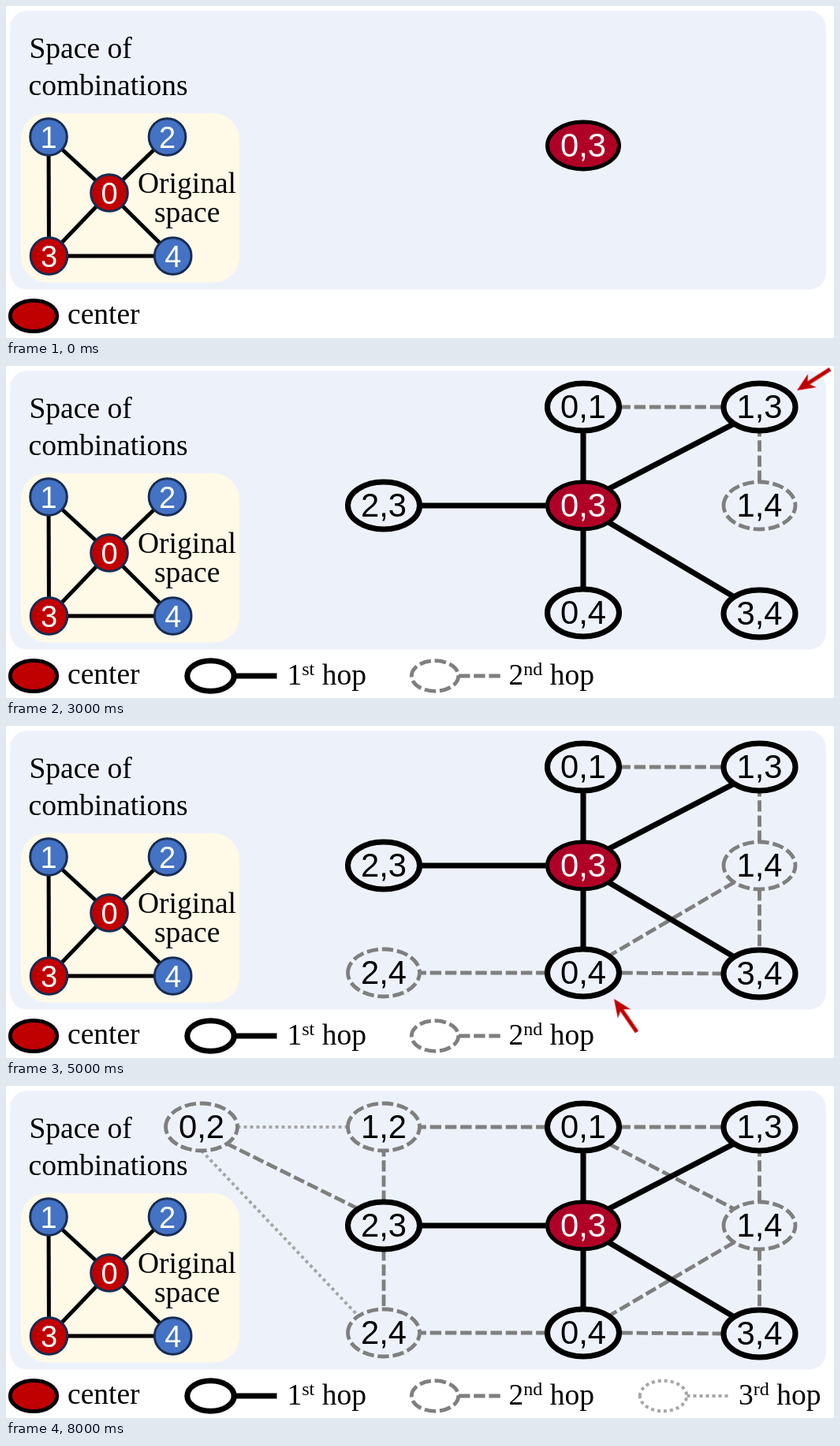
An HTML page for the animation above (9 s loop, 1050x421 px).

```html
<!DOCTYPE html>
<html lang="en">
<head>
<meta charset="utf-8">
<title>Space of combinations</title>
<style>
  html, body { margin: 0; width: 100%; height: 100%; overflow: hidden; background: #fff; }
  svg { display: block; width: 1050px; height: 421px; }
  .serif { font: 37.5px "Liberation Serif", "Times New Roman", serif; }
  .sans { font: 41.7px "Liberation Sans", Arial, sans-serif; text-anchor: middle; }
  .small { font-size: 38px; fill: #fff; }
  .center { fill: #b00026; stroke: #000; stroke-width: 5; }
  .hop1 { fill: none; stroke: #000; stroke-width: 7.1; }
  .hop2 { fill: none; stroke: #7f7f7f; stroke-width: 4.8; stroke-dasharray: 14.4 4.8; }
  .hop3 { fill: none; stroke: #a6a6a6; stroke-width: 4; stroke-dasharray: 4 4; }
  .link { stroke: #000; stroke-width: 5; }
  .arrow { stroke: #c00000; stroke-width: 5; }
</style>
</head>
<body>
<svg id="stage" viewBox="0 0 1050 421"></svg>
<script>
const STEP = 1000, STEPS = 9;
const RX = 45.5, RY = 30;
const stage = document.getElementById('stage');

function add(tag, attrs, parent = stage) {
  const el = document.createElementNS('http://www.w3.org/2000/svg', tag);
  for (const key in attrs) el.setAttribute(key, attrs[key]);
  return parent.appendChild(el);
}

// Visible from step `from` until just before step `to`.
function show(el, from, to = STEPS) {
  if (from === 0 && to === STEPS) return;
  const frames = Array.from({ length: STEPS + 1 }, (_, i) => ({
    opacity: i >= from && (i < to || to === STEPS) ? 1 : 0,
    easing: 'steps(1, end)'
  }));
  el.animate(frames, { duration: STEP * STEPS, iterations: Infinity });
}

function text(str, x, y, cls, parent) {
  add('text', { x, y, class: cls }, parent).textContent = str;
}

function line(x1, y1, x2, y2, cls, parent) {
  return add('line', { x1, y1, x2, y2, class: cls }, parent);
}

// Outline starts at the left end and runs clockwise.
function oval(x, y, rx, ry, cls, parent) {
  const arc = `a${rx} ${ry} 0 0 1`;
  return add('path', {
    d: `M${x - rx} ${y}${arc} ${2 * rx} 0${arc} ${-2 * rx} 0z`, class: cls
  }, parent);
}

// Panels and captions
add('rect', { x: 5, y: 6, width: 1035, height: 353.5, rx: 22, fill: '#edf2fa' });
add('rect', { x: 19, y: 136, width: 277, height: 214.5, rx: 33, fill: '#fff9e7' });
text('Space of', 29.5, 66, 'serif');
text('combinations', 28.5, 112.5, 'serif');
text('Original', 167, 237, 'serif');
text('space', 188, 273.5, 'serif');

// Small graph
const dots = [[131, 237], [54, 166], [204.5, 166], [54.5, 317], [211.7, 317]];
for (const [a, b] of [[0, 1], [0, 2], [0, 3], [0, 4], [1, 3], [3, 4]])
  line(...dots[a], ...dots[b], 'link');
dots.forEach(([cx, cy], i) => {
  const fill = i === 0 || i === 3 ? '#c00000' : '#4472c4';
  add('circle', { cx, cy, r: 23.3, fill, stroke: '#172c51', 'stroke-width': 3 });
  text(i, cx, cy + 13.5, 'sans small');
});

// Combination graph: label -> x, y, class, first step
const nodes = {
  '0,3': [732, 177, 'center', 0],
  '0,1': [732, 52, 'hop1', 1],
  '0,4': [732, 313, 'hop1', 1],
  '1,3': [955.5, 52, 'hop1', 2],
  '2,3': [479, 177, 'hop1', 2],
  '3,4': [955.5, 314, 'hop1', 2],
  '1,4': [955.5, 177, 'hop2', 3],
  '2,4': [479, 313, 'hop2', 5],
  '0,2': [248, 52, 'hop2', 6],
  '1,2': [479, 52, 'hop2', 6]
};

// from, side, to, side, class, first step; sides are eighth turns clockwise from the right
const edges = [
  ['1,2', 4, '0,2', 0, 'hop3', 8],
  ['0,2', 2, '2,4', 5, 'hop3', 8],
  ['0,1', 0, '1,3', 4, 'hop2', 3],
  ['1,4', 6, '1,3', 2, 'hop2', 3],
  ['1,4', 2, '3,4', 6, 'hop2', 4],
  ['3,4', 4, '0,4', 0, 'hop2', 4],
  ['1,4', 3, '0,4', 7, 'hop2', 5],
  ['0,4', 4, '2,4', 0, 'hop2', 5],
  ['2,3', 5, '0,2', 1, 'hop2', 6],
  ['2,3', 6, '1,2', 2, 'hop2', 6],
  ['2,3', 2, '2,4', 6, 'hop2', 6],
  ['0,1', 4, '1,2', 0, 'hop2', 7],
  ['0,1', 1, '1,4', 5, 'hop2', 7],
  ['0,1', 2, '0,3', 6, 'hop1', 1],
  ['0,3', 2, '0,4', 6, 'hop1', 1],
  ['0,3', 7, '1,3', 3, 'hop1', 2],
  ['0,3', 1, '3,4', 5, 'hop1', 2],
  ['2,3', 0, '0,3', 4, 'hop1', 2]
];

function port(label, side) {
  const [x, y] = nodes[label], a = side * Math.PI / 4;
  return [x + RX * Math.cos(a), y + RY * Math.sin(a)];
}

for (const [a, sa, b, sb, cls, from] of edges)
  show(line(...port(a, sa), ...port(b, sb), cls), from);

for (const label in nodes) {
  const [x, y, cls, from] = nodes[label];
  const g = add('g', {});
  oval(x, y, RX, RY, cls, g);
  text(label, x, y + 14.3, 'sans', g);
  if (cls === 'center') g.lastChild.setAttribute('fill', '#fff');
  show(g, from);
}

// Pointer at the node being expanded: step, tail, tip
const arrows = [
  [3, 1045, 4, 1003, 31],
  [4, 1026, 381, 997, 339],
  [5, 800, 388, 771, 346],
  [6, 398, 257, 440, 214],
  [7, 651, 132, 693, 89]
];
for (const [step, x1, y1, x2, y2] of arrows) {
  const turn = Math.atan2(y2 - y1, x2 - x1) * 180 / Math.PI;
  const len = Math.hypot(x2 - x1, y2 - y1);
  const g = add('g', { transform: `translate(${x2} ${y2}) rotate(${turn})` });
  line(-len, 0, -14, 0, 'arrow', g);
  add('path', { d: 'M0 0L-23 -10L-16 0L-23 10z', fill: '#c00000' }, g);
  show(g, step, step + 1);
}

// Legend
oval(35, 393, 29.7, 19.5, 'center').style.fill = '#c00000';
text('center', 78, 403, 'serif');
const legend = [
  [259.5, 356.5, '1', 'st', 'hop1', 1],
  [544, 637.5, '2', 'nd', 'hop2', 3],
  [833.5, 929, '3', 'rd', 'hop3', 8]
];
for (const [x, tx, num, sup, cls, from] of legend) {
  const g = add('g', {});
  line(x + 30, 393, x + 84, 393, cls, g);
  oval(x, 393, 29.7, 19.3, cls, g);
  const t = add('text', { x: tx, y: 404, class: 'serif' }, g);
  add('tspan', {}, t).textContent = num;
  add('tspan', { dy: -12, 'font-size': 24 }, t).textContent = sup;
  add('tspan', { dy: 12 }, t).textContent = ' hop';
  show(g, from);
}
</script>
</body>
</html>
```
